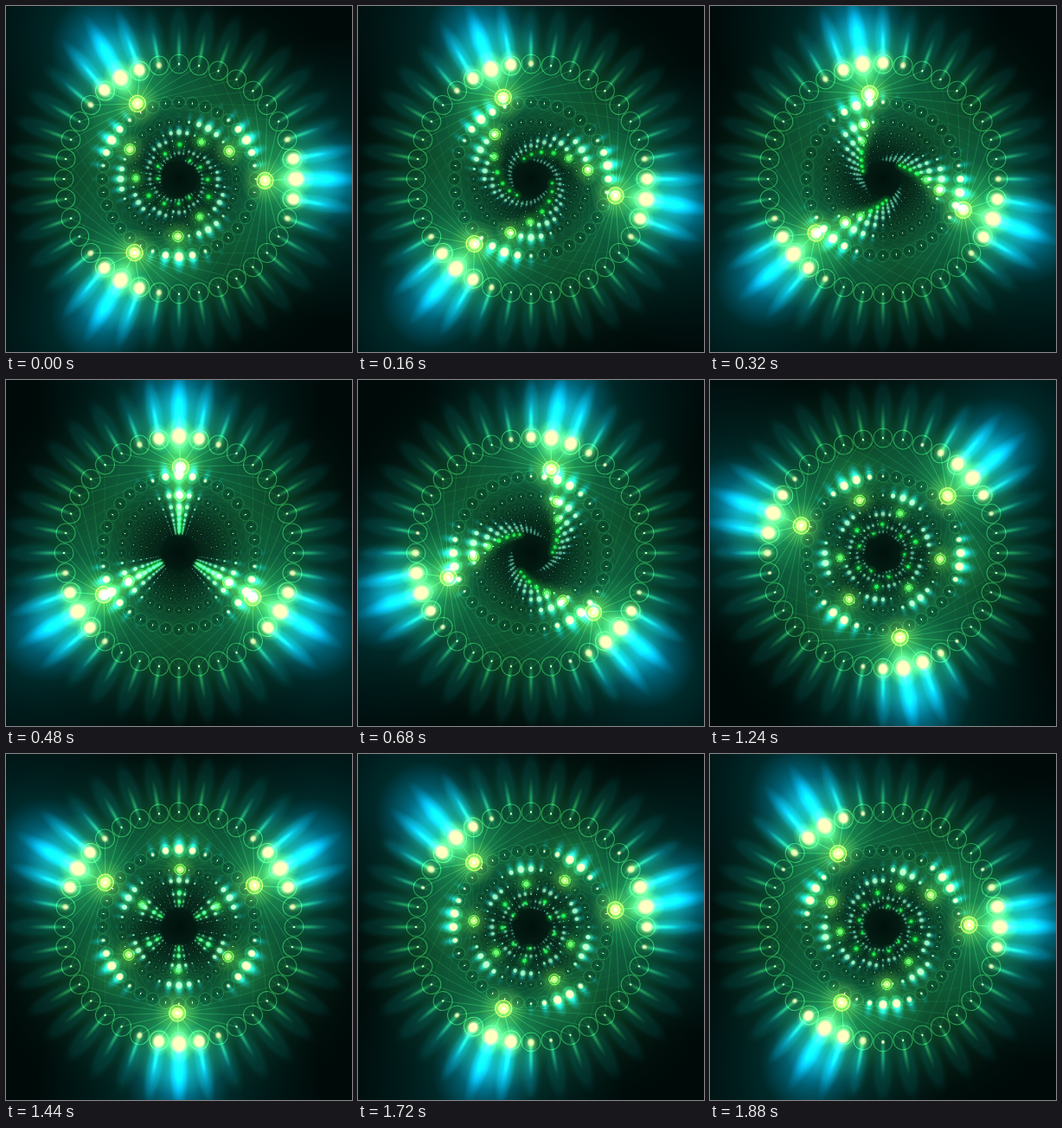
Recreate the animation shown at these times as an HTML page with a canvas. Size 400x400 px, loop 1.92 s.

```html
<!DOCTYPE html>
<html lang="en">
<head>
<meta charset="utf-8">
<title>Light wheel</title>
<style>
html, body { margin: 0; width: 100%; height: 100%; overflow: hidden; background: #000; }
canvas { display: block; width: 400px; height: 400px; }
</style>
</head>
<body>
<canvas id="stage" width="400" height="400"></canvas>
<script>
const ctx = document.getElementById('stage').getContext('2d');
const TAU = Math.PI * 2, DEG = Math.PI / 180;
const STEP = 40, STEPS = 48;
const RINGS = 11, BULBS = 36, ARMS = 3, SPAN = 360 / ARMS;
const R = 133, ORBIT = 99.5, LEAD = 1.1;

const rgb = (r, g, b) => `${r},${g},${b}`;
const GREEN = rgb(60, 185, 75), TEAL = rgb(0, 75, 80), CYAN = rgb(0, 150, 225);
const GOLD = rgb(190, 175, 35), MINT = rgb(60, 190, 120), PALE = rgb(255, 255, 195);
const bell = (x, width) => Math.exp(-((x / width) ** 2));

// Soft elliptical light; hold is the part of the radius kept at full strength.
function glow(x, y, rx, ry, color, alpha, hold = 0) {
  if (alpha < 0.01) return;
  ctx.save();
  ctx.translate(x, y);
  ctx.scale(rx, ry);
  const g = ctx.createRadialGradient(0, 0, hold, 0, 0, 1);
  g.addColorStop(0, `rgba(${color},${alpha})`);
  g.addColorStop(0.5, `rgba(${color},${alpha * 0.38})`);
  g.addColorStop(1, `rgba(${color},0)`);
  ctx.fillStyle = g;
  ctx.beginPath();
  ctx.arc(0, 0, 1, 0, TAU);
  ctx.fill();
  ctx.restore();
}

function circle(x, r, color, alpha, width) {
  ctx.strokeStyle = `rgba(${color},${alpha})`;
  ctx.lineWidth = width;
  ctx.beginPath();
  ctx.arc(x, 0, r, 0, TAU);
  ctx.stroke();
}

function turned(deg, paint) {
  ctx.save();
  ctx.rotate(deg * DEG);
  paint();
  ctx.restore();
}

function eachArm(deg, paint) {
  for (let j = 0; j < ARMS; j++) turned(deg + j * SPAN, paint);
}

// Degrees from the nearest arm.
function offArm(deg, arm) {
  const d = (((deg - arm) % SPAN) + SPAN) % SPAN;
  return Math.min(d, SPAN - d);
}

function backdrop() {
  const g = ctx.createRadialGradient(0, 0, 0, 0, 0, 280);
  for (let i = 0; i <= 14; i++) {
    const b = bell(i * 20 - 98, 64);
    g.addColorStop(i / 14, `rgb(${14 * b},${10 + 74 * b},${9 + 40 * b})`);
  }
  ctx.fillStyle = g;
  ctx.fillRect(-200, -200, 400, 400);
}

// Broad light around the lit part of a ring.
function armLight(arm, k) {
  eachArm(arm, () => {
    if (k === 1) {
      glow(195, 0, 165, 165, TEAL, 0.6);
      glow(172, 0, 66, 62, CYAN, 0.65);
    }
    glow(R, 0, 62, 66, GREEN, 0.55 / k);
  });
}

// Threads from each bulb to the moving lamps, weaker with distance.
function threads(arm, k) {
  ctx.lineWidth = 0.8;
  for (let j = 0; j < ARMS; j++) {
    const p = (arm + LEAD + j * SPAN) * DEG;
    const px = Math.cos(p) * ORBIT, py = Math.sin(p) * ORBIT;
    for (let i = 0; i < BULBS; i++) {
      const a = i * TAU / BULBS;
      const x = Math.cos(a) * R, y = Math.sin(a) * R;
      const alpha = 0.5 * (1 - Math.hypot(x - px, y - py) / 190) / k;
      if (alpha < 0.02) continue;
      ctx.strokeStyle = `rgba(${GREEN},${alpha})`;
      ctx.beginPath();
      ctx.moveTo(x, y);
      ctx.lineTo(px, py);
      ctx.stroke();
    }
  }
}

function outerBeam(near) {
  glow(168, 0, 38, 13, TEAL, 0.22, 0.6);
  glow(148, 0, 26, 3.4, GREEN, 0.5);
  glow(152 + 14 * near, 0, 24 + 30 * near, 4 + 7 * near, CYAN, 0.6 * near);
}

function innerBeam(near, k) {
  // Unlit cups are darker than the disc behind them.
  ctx.globalCompositeOperation = 'source-over';
  glow(R, 0, 11, 11, rgb(0, 40, 26), 0.6 / k * (1 - near), 0.7);
  ctx.globalCompositeOperation = 'lighter';
  glow(R + 10, 0, 12 + 12 * near, 4 + 8 * near, CYAN, 1.6 * near / k);
  glow(R, 0, 6, 1.6, GREEN, 0.5);
}

function bulb(deg, arm, k) {
  const d = offArm(deg, arm), outer = k === 1;
  const lit = bell(d, 14), near = bell(d, 22);
  const fade = Math.min(1, 3 / k);
  turned(deg, () => {
    if (outer) outerBeam(near);
    else innerBeam(near, k);
    circle(R, 11, GREEN, 0.5 / k, 1);
    glow(R, 0, 2, 1.6, PALE, 0.8 * fade, 0.3);
    if (lit < 0.015) return;
    const r = (2 + 7.5 * lit ** 0.75) * (outer ? 1 : 0.88);
    glow(R + 2, 0, r * 2.4, r * 2, outer ? GOLD : MINT, 0.75 * fade * Math.min(1, lit * 4));
    ctx.globalCompositeOperation = 'source-over';
    glow(R + 2 * lit, 0, r * 1.25, r * 1.15, k < 3 ? PALE : rgb(190, 255, 205),
      fade * Math.min(1, 0.55 + lit), 0.6);
    ctx.globalCompositeOperation = 'lighter';
  });
}

// Lamps shift from gold to green towards the centre.
function lamp(k) {
  const tint = rgb(Math.max(20, 290 - 75 * k), 200, 45);
  glow(ORBIT, 0, 28, 28, tint, 0.4);
  glow(ORBIT, 0, 10, 10, tint, 0.5, 0.5);
  if (k < 4) {
    circle(ORBIT, 9.5, tint, 0.6, 1.2);
    circle(ORBIT, 5, PALE, 0.4, 1.2);
  }
  glow(ORBIT, 0, 4, 4, k < 3 ? PALE : tint, 0.6, 0.2);
}

function draw(n) {
  const turn = 2.5 * n - 30;
  const armOf = k => 30 + k * turn;
  ctx.setTransform(1, 0, 0, 1, 200, 200);
  ctx.globalCompositeOperation = 'source-over';
  backdrop();
  ctx.globalCompositeOperation = 'lighter';
  for (let k = RINGS; k >= 1; k--) {
    const arm = armOf(k), s = 2 / (k + 1);
    ctx.save();
    ctx.scale(s, s);
    if (k < 4) {
      armLight(arm, k);
      threads(arm, k);
    }
    for (let i = 0; i < BULBS; i++) bulb(i * 360 / BULBS, arm, k);
    if (k < 8) eachArm(arm + LEAD, () => lamp(k));
    ctx.restore();
  }
}

const start = performance.now();
let last = 0;
function tick() {
  const n = Math.floor((performance.now() - start) / STEP) % STEPS;
  if (n !== last) draw(last = n);
  requestAnimationFrame(tick);
}
draw(0);
requestAnimationFrame(tick);
</script>
</body>
</html>
```
